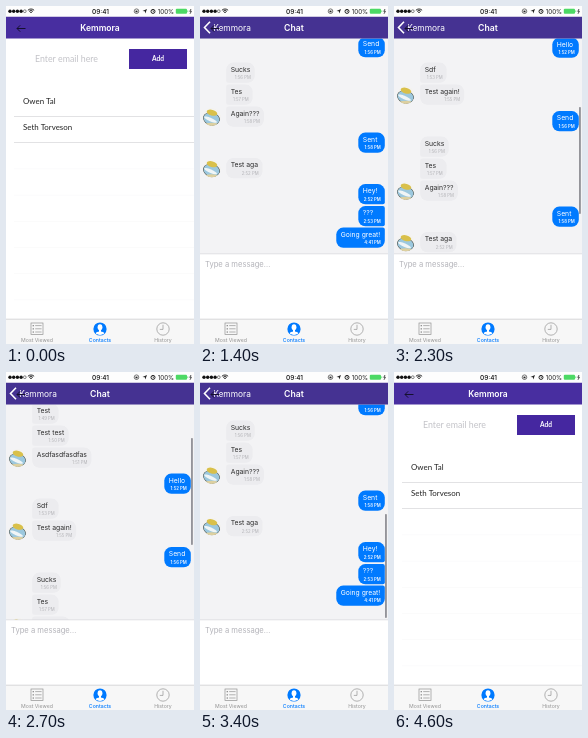
Recreate the animation shown at these times as an HTML page with a canvas. Size 188 by 338 pixels, loop 4.9 s.

```html
<!DOCTYPE html>
<html lang="en">
<head>
<meta charset="utf-8">
<title>Chat demo</title>
<style>
html, body { margin: 0; width: 100%; height: 100%; overflow: hidden; background: #fff; }
canvas { display: block; width: 188px; height: 338px; }
</style>
</head>
<body>
<canvas id="stage"></canvas>
<script>
const W = 188, H = 338, LOOP = 4900, STEP = 100;
const APP = 'Kemmora';
const UI = 'Inter, "Liberation Sans", sans-serif';
const SOFT = 'Lato, "Open Sans", sans-serif';
const BLUE = '#007aff', GREY = '#929292';

const canvas = document.getElementById('stage');
const ctx = canvas.getContext('2d');
const dpr = window.devicePixelRatio || 1;
canvas.width = W * dpr;
canvas.height = H * dpr;

// Text, time, y with the chat at rest, sent by me, first / last of its group
const messages = [
  ['Test', '1:49 PM', -106, 0, 0, 0],
  ['Test test', '1:50 PM', -84, 0, 0, 0],
  ['Asdfasdfasdfas', '1:51 PM', -62, 0, 0, 1],
  ['Hello', '1:52 PM', -36, 1, 1, 1],
  ['Sdf', '1:53 PM', -11, 0, 1, 0],
  ['Test again!', '1:55 PM', 11, 0, 0, 1],
  ['Send', '1:56 PM', 37.5, 1, 1, 1],
  ['Sucks', '1:56 PM', 63, 0, 1, 0],
  ['Tes', '1:57 PM', 85, 0, 0, 0],
  ['Again???', '1:58 PM', 107, 0, 0, 1],
  ['Sent', '1:58 PM', 133, 1, 1, 1],
  ['Test aga', '2:52 PM', 158.5, 0, 1, 1],
  ['Hey!', '2:52 PM', 184.5, 1, 1, 0],
  ['???', '2:53 PM', 206.5, 1, 0, 0],
  ['Going great!', '4:41 PM', 228, 1, 0, 1]
];

const scrollKeys = [[2000, 0], [2100, 14], [2300, 74], [2500, 122], [2700, 144],
  [2800, 147], [2900, 137], [3000, 113], [3200, 38], [3300, 6], [3400, -8],
  [3500, -5], [3600, -2], [3700, 0]];

const clamp = v => Math.max(0, Math.min(1, v));
const lerp = (a, b, k) => a + (b - a) * k;

function spring(ms) {
  if (ms <= 0) return 0;
  const x = ms * 0.0173;
  return x > 7 ? 1 : 1 - (1 + x) * Math.exp(-x);
}

function scrollAt(t) {
  const i = scrollKeys.findIndex(k => k[0] > t);
  if (i < 1) return 0;
  const [t0, a] = scrollKeys[i - 1], [t1, b] = scrollKeys[i];
  return lerp(a, b, (t - t0) / (t1 - t0));
}

function rect(x, y, w, h, color) {
  ctx.fillStyle = color;
  ctx.fillRect(x, y, w, h);
}

function round(x, y, w, h, r, color) {
  ctx.fillStyle = color;
  ctx.beginPath();
  ctx.roundRect(x, y, w, h, r);
  ctx.fill();
}

function oval(x, y, rx, ry, color, tilt = 0) {
  ctx.fillStyle = color;
  ctx.beginPath();
  ctx.ellipse(x, y, rx, ry, tilt, 0, 7);
  ctx.fill();
}

function ring(x, y, r, color, width) {
  ctx.strokeStyle = color;
  ctx.lineWidth = width;
  ctx.beginPath();
  ctx.arc(x, y, r, 0, 7);
  ctx.stroke();
}

function line(color, width, ...pts) {
  ctx.strokeStyle = color;
  ctx.lineWidth = width;
  ctx.beginPath();
  pts.forEach(p => ctx.lineTo(...p));
  ctx.stroke();
}

function text(str, x, y, font, color, align = 'left') {
  ctx.font = font;
  ctx.fillStyle = color;
  ctx.textAlign = align;
  ctx.fillText(str, x, y);
}

function withAlpha(a, draw) {
  ctx.save();
  ctx.globalAlpha = clamp(a);
  draw();
  ctx.restore();
}

function drawStatus() {
  rect(0, 0, W, 10.5, '#fdfdfd');
  for (let i = 0; i < 4; i++) oval(4 + i * 3.7, 5.2, 1.7, 1.7, '#111');
  ring(18.8, 5.2, 1.4, '#111', 0.5);
  ctx.lineWidth = 0.9;
  ctx.strokeStyle = '#111';
  for (const r of [1.2, 2.8, 4.4]) {
    ctx.beginPath();
    ctx.arc(25, 7.4, r, -Math.PI * 0.75, -Math.PI * 0.25);
    ctx.stroke();
  }
  text('09:41', 94.5, 7.7, '500 6.5px ' + UI, '#111', 'center');
  ring(130.5, 5.2, 2.3, '#222', 0.6);
  rect(129.5, 4.6, 2, 1.7, '#222');
  ctx.fillStyle = '#222';
  ctx.beginPath();
  [[141, 3], [139.3, 7.6], [138.8, 5.3], [136.5, 4.9]].forEach(p => ctx.lineTo(...p));
  ctx.fill();
  ring(147, 5.4, 2, '#222', 1);
  line('#222', 0.6, [147, 4], [147, 5.5], [148, 5.5]);
  text('100%', 168, 7.5, '6.1px ' + UI, '#222', 'right');
  round(169.8, 2.8, 11.2, 5, 1, '#4cd964');
  rect(181.4, 4.4, 0.8, 1.8, '#4cd964');
  line('#222', 0.8, [185, 3], [183.8, 5.4], [185.4, 5.2], [184, 7.8]);
}

function drawNav(p) {
  rect(0, 10.5, W, 22, `rgb(${lerp(72, 69, p)},${lerp(46, 50, p)},${lerp(160, 146, p)})`);
  const titleX = lerp(94, 32, p);
  withAlpha(1 - p * 3.1, () =>
    text(APP, titleX, 24.6, '600 8.5px ' + UI, '#fff', 'center'));
  withAlpha(p * 1.6 - 0.6, () => {
    text(APP, titleX, 24.6, '8.4px ' + UI, '#fff', 'center');
    line('#fff', 1.6, [10, 15.8], [4.5, 21.5], [10, 27.2]);
  });
  withAlpha(p ** 1.4, () =>
    text('Chat', lerp(192, 94, p), 24.6, '600 8.7px ' + UI, '#fff', 'center'));
  line('#15102f', 1, [19.5, 22.5], [11, 22.5]);
  line('#15102f', 1, [14.2, 19.3], [11, 22.5], [14.2, 25.7]);
}

function drawList() {
  rect(0, 32.5, W + 60, 281, '#fff');
  text('Enter email here', 29, 56, '8.8px ' + SOFT, '#c3c3c8');
  rect(123, 43, 58, 20, '#4527a0');
  text('Add', 152, 54.6, 'bold 6.6px ' + SOFT, '#fff', 'center');
  text('Owen Tal', 17, 98.4, '7.9px ' + SOFT, '#222');
  text('Seth Torveson', 17, 124.4, '7.9px ' + SOFT, '#222');
  for (let i = 0; i < 8; i++) {
    rect(8, 110.2 + i * 26.2, W, 0.6, i < 2 ? '#cfcfd3' : '#f8f8f9');
  }
}

function drawAvatar(y) {
  ctx.save();
  ctx.beginPath();
  ctx.arc(11.8, y, 9, 0, 7);
  ctx.clip();
  rect(2, y - 9, 20, 18, '#f4f3f0');
  oval(11.5, y + 2, 8.7, 6.6, '#59605c', 0.25);
  oval(11.5, y + 1.8, 8, 5.9, '#9cc8de', 0.25);
  oval(10.5, y + 2.6, 7, 1.7, '#f0f5f6', 0.4);
  oval(12, y - 4.3, 5.4, 2.9, '#d9c04a', 0.25);
  oval(11.5, y + 7.4, 6.5, 1.6, '#ddd0a0');
  ctx.restore();
}

function drawMessage([str, time, y, mine, first, last], shift) {
  y += shift;
  if (y < 5 || y > 275) return;
  const font = '6.8px ' + UI;
  ctx.font = font;
  const w = Math.max(ctx.measureText(str).width, 17.5) + 9;
  const x = mine ? 184.8 - w : 26.2;
  const a = first ? 7 : 2, b = last ? 7 : 2;
  round(x, y - 6.4, w, 20.2, mine ? [7, a, b, 7] : [a, 7, 7, b], mine ? BLUE : '#ececef');
  text(str, x + 4.5, y + 2.5, font, mine ? '#fff' : '#2a2a2a');
  text(time, x + w - 4, y + 10.4, (mine ? '600' : '400') + ' 4.3px ' + UI,
    mine ? '#f0f7ff' : '#b2b2b6', 'right');
  if (!mine && last) drawAvatar(y + 4);
}

function drawChat(t) {
  const shift = scrollAt(t);
  ctx.save();
  ctx.beginPath();
  ctx.rect(0, 32.5, W, 215.5);
  ctx.clip();
  rect(0, 32.5, W, 216, '#f3f3f5');
  if (t >= 1000) messages.forEach(m => drawMessage(m, shift));
  if (t >= 2100 && t <= 3700) {
    const top = 138 - shift * 0.5;
    round(185.2, top, 1.5, Math.min(107, 246 - top), 0.7, 'rgba(60,60,70,.65)');
  }
  ctx.restore();
  rect(0, 248, W, 66, '#fff');
  rect(0, 247.6, W, 0.6, '#d2d2d6');
  text('Type a message...', 5, 260.8, '7.6px ' + UI, '#b4b4ba');
}

function drawTabs() {
  rect(0, 313, W, 25, '#f7f7f7');
  rect(0, 312.8, W, 0.6, '#bdbdc0');
  ctx.strokeStyle = GREY;
  ctx.lineWidth = 0.7;
  ctx.strokeRect(25, 317, 12, 11.5);
  for (const y of [319.6, 322.8, 326]) {
    rect(26.6, y - 0.6, 1.4, 1.3, GREY);
    line(GREY, 0.7, [29.2, y], [35.6, y]);
  }
  oval(94, 323, 6.6, 6.6, BLUE);
  ctx.save();
  ctx.beginPath();
  ctx.arc(94, 323, 5.9, 0, 7);
  ctx.clip();
  oval(94, 321.2, 2.4, 3, '#fff');
  rect(93, 323, 2, 3, '#fff');
  oval(94, 328.2, 4.6, 2.7, '#fff');
  ctx.restore();
  ring(157, 323, 6.2, GREY, 0.7);
  line(GREY, 0.7, [157, 318.8], [157, 323.4], [153.8, 323.4]);
  const font = '5.2px ' + UI;
  text('Most Viewed', 31, 336, font, GREY, 'center');
  text('Contacts', 94, 336, '500 ' + font, BLUE, 'center');
  text('History', 157, 336, font, GREY, 'center');
}

function draw(t) {
  // 0 = contact list, 1 = chat
  const p = t < 3850 ? spring(t - 50) : 1 - spring(t - 3850);
  ctx.setTransform(dpr, 0, 0, dpr, 0, 0);
  rect(0, 0, W, H, '#fff');

  ctx.save();
  ctx.translate(-56 * p, 0);
  drawList();
  ctx.restore();

  if (p > 0) {
    const x = W * (1 - p);
    rect(0, 32.5, W, 281, `rgba(10,0,40,${0.15 * p})`);
    const shade = ctx.createLinearGradient(x - 5, 0, x, 0);
    shade.addColorStop(0, 'rgba(0,0,0,0)');
    shade.addColorStop(1, 'rgba(0,0,0,.1)');
    rect(x - 5, 32.5, 5, 281, shade);
    ctx.save();
    ctx.translate(x, 0);
    drawChat(t);
    ctx.restore();
  }
  drawNav(p);
  drawStatus();
  drawTabs();
}

const start = performance.now();
function tick() {
  const t = (performance.now() - start) % LOOP;
  draw(Math.floor(t / STEP) * STEP);
  requestAnimationFrame(tick);
}
tick();
</script>
</body>
</html>
```
